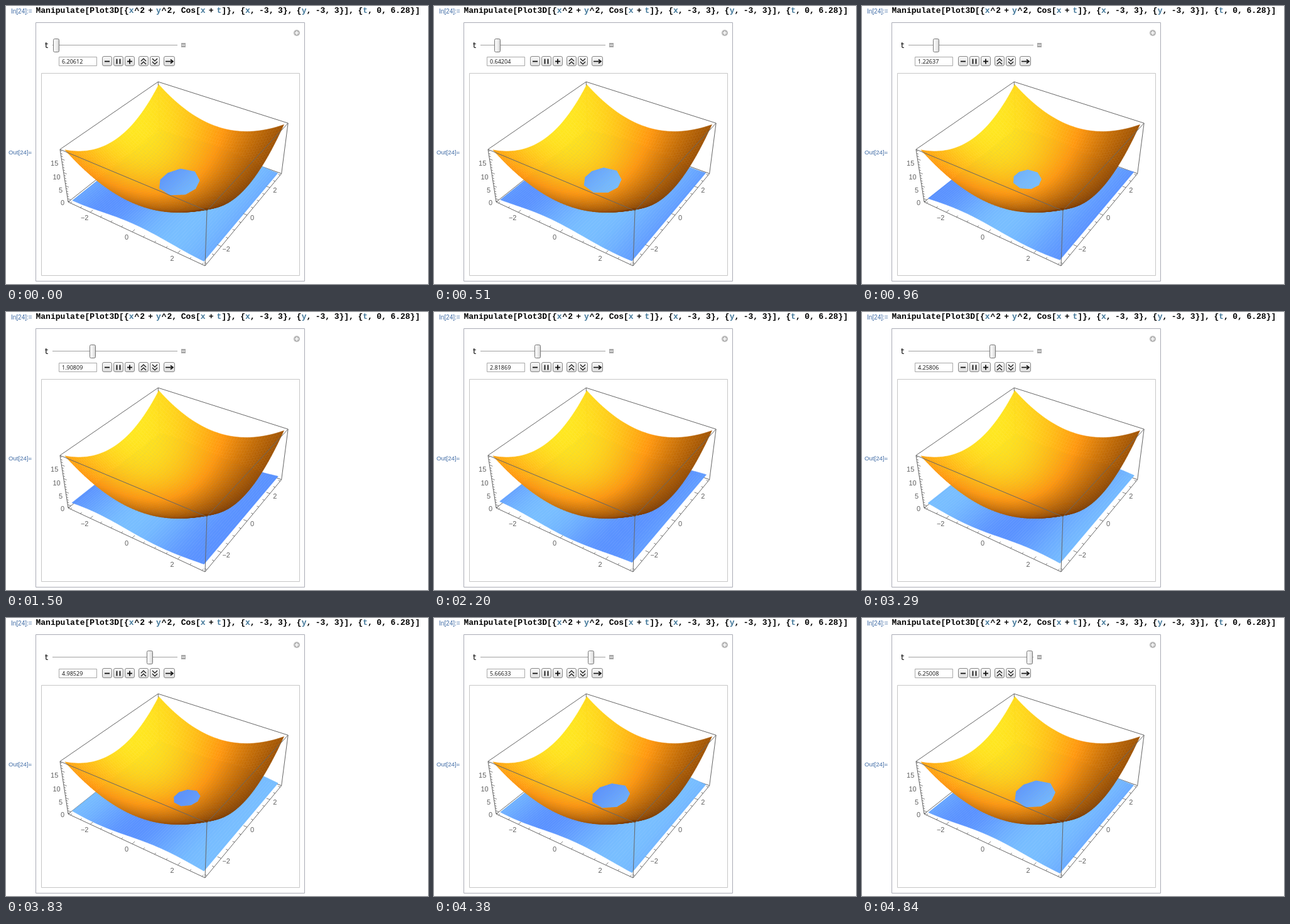
Recreate the animation shown at these times as an HTML page with a canvas. Size 672 by 444 pixels, loop 4.99 s.

```html
<!DOCTYPE html>
<html lang="en">
<head>
<meta charset="utf-8">
<title>Manipulate Plot3D</title>
<style>
html, body { margin: 0; width: 672px; height: 444px; overflow: hidden; background: #fff; }
canvas { display: block; }
</style>
</head>
<body>
<canvas id="stage" width="672" height="444"></canvas>
<script>
const W = 672, H = 444, LOOP = 4990;
const FIRST = 33, PERIOD = 77.2;
const stage = document.getElementById('stage').getContext('2d');
const SANS = '"Liberation Sans", Arial, sans-serif';
const MONO = '"Liberation Mono", "Courier New", monospace';

// Refresh count since the start; every eleventh refresh is dropped
function stepAt(time) {
  const n = Math.floor((time - FIRST) / PERIOD);
  return n % 11 === 4 ? n - 1 : n;
}

// Refresh count and parameter t, nearly linear
const keys = [[0, 0.05], [6, 0.64204], [19, 1.90809], [28, 2.81869],
  [42, 4.25806], [49, 4.98529], [62, 6.25008]];

function paramAt(n) {
  let i = 0;
  while (i < keys.length - 2 && n >= keys[i + 1][0]) i++;
  const [n0, t0] = keys[i], [n1, t1] = keys[i + 1];
  return t0 + (t1 - t0) * (n - n0) / (n1 - n0);
}

// Perspective of the unit box
function project(a, b, c) {
  const d = 1 - 0.1199 * a + 0.197 * b - 0.06684 * c;
  return [
    (99 + 179.99 * a + 193.5 * b - 18.75 * c) / d,
    (313 + 52.24 * a - 76.9 * b - 99.31 * c) / d
  ];
}
const ux = x => (x + 3.12) / 6.24;
const uz = z => (z + 1.38) / 19.76;
const point = (x, y, z) => project(ux(x), ux(y), uz(z));

function trace(g, pts) {
  g.beginPath();
  pts.forEach(p => g.lineTo(p[0], p[1]));
}

function fillPoly(g, pts, color) {
  trace(g, pts);
  g.closePath();
  g.fillStyle = g.strokeStyle = color;
  g.lineWidth = 0.5;
  g.fill();
  g.stroke();
}

function line(g, pts, color, width = 1) {
  trace(g, pts);
  g.strokeStyle = color;
  g.lineWidth = width;
  g.stroke();
}

function text(g, str, x, y, font, color, align = 'left') {
  g.font = font;
  g.fillStyle = color;
  g.textAlign = align;
  g.fillText(str, x, y);
}

function box(g, x, y, w, h, r, fill, stroke) {
  g.beginPath();
  g.roundRect(x, y, w, h, r);
  if (fill) { g.fillStyle = fill; g.fill(); }
  g.strokeStyle = stroke;
  g.lineWidth = 1;
  g.stroke();
}

function layer(paint) {
  const c = document.createElement('canvas');
  c.width = W;
  c.height = H;
  paint(c.getContext('2d'));
  return c;
}

function bowlColor(x, y) {
  const nx = -0.253 * x, ny = -0.253 * y;
  const v = (0.58 * nx - 0.2 * ny + 0.625) / Math.hypot(nx, ny, 1);
  const r = Math.min(255, 118 + 150 * v + 150 * v * v);
  const green = 56 + 95 * v + 122 * v * v;
  return `rgb(${r},${green},${2 + 40 * v * v})`;
}

const bowl = layer(g => {
  const n = 48, s = 6 / n;
  const at = (x, y) => point(x, y, x * x + y * y);
  for (let j = n - 1; j >= 0; j--) {
    for (let i = 0; i < n; i++) {
      const x = -3 + i * s, y = -3 + j * s;
      fillPoly(g, [at(x, y), at(x + s, y), at(x + s, y + s), at(x, y + s)],
        bowlColor(x + s / 2, y + s / 2));
    }
  }
});

function drawWave(g, t) {
  const n = 60, s = 6 / n;
  for (let i = 0; i < n; i++) {
    const x = -3 + i * s;
    const z0 = Math.cos(x + t), z1 = Math.cos(x + s + t);
    const k = Math.sin(x + s / 2 + t);
    fillPoly(g, [point(x, -3, z0), point(x + s, -3, z1), point(x + s, 3, z1), point(x, 3, z0)],
      `rgb(${105 + 15 * k},${168 + 22 * k},255)`);
  }
}

// Coarse outline of the region where the wave lies above the bowl
function holeShape(t) {
  const f = (x, y) => Math.cos(x + t) - x * x - y * y - 0.11;
  let cx = 0;
  for (let x = -1; x <= 1; x += 0.01) if (f(x, 0) > f(cx, 0)) cx = x;
  if (f(cx, 0) < 0) return null;
  const pts = [], sides = 9;
  for (let i = 0; i < sides; i++) {
    const angle = i * 2 * Math.PI / sides;
    const u = Math.cos(angle), v = Math.sin(angle);
    let lo = 0, hi = 2;
    for (let n = 0; n < 20; n++) {
      const r = (lo + hi) / 2;
      if (f(cx + r * u, r * v) > 0) lo = r; else hi = r;
    }
    const x = cx + lo * u;
    pts.push(point(x, lo * v, Math.cos(x + t)));
  }
  return pts;
}

// Corners are numbered by bits x, y, z; corner 2 is the hidden one
function boxEdges(g, back) {
  for (let i = 0; i < 8; i++) {
    for (const bit of [1, 2, 4]) {
      if (i & bit) continue;
      const j = i | bit;
      if ((i === 2 || j === 2) !== back) continue;
      line(g, [i, j].map(k => project(k & 1, k >> 1 & 1, k >> 2)), '#666');
    }
  }
}

function axis(g, from, to, step, major, at, dx, dy, align) {
  for (let v = from; v <= to; v += step) {
    const big = v % major === 0;
    const p = at(v, 0);
    line(g, [p, at(v, big ? 0.025 : 0.014)], '#606060', 0.8);
    if (big) {
      text(g, String(v).replace('-', '−'), p[0] + dx, p[1] + dy, '11px ' + SANS, '#606060', align);
    }
  }
}

function axes(g) {
  axis(g, -3, 3, 0.5, 2, (v, d) => project(ux(v), d, 0), -9, 12.5, 'center');
  axis(g, -3, 3, 0.5, 2, (v, d) => project(1 - d, ux(v), 0), 8, 8, 'center');
  axis(g, -1, 18, 1, 5, (v, d) => project(d, 0, uz(v)), -5, 10.5, 'right');
}

function codeLine(g) {
  const code = 'Manipulate[Plot3D[{x^2+y^2, Cos[x+t]}, {x, -3, 3}, {y, -3, 3}], {t, 0, 6.28}]';
  const pad = { '+': 5, '^': 1, ' ': -0.65 };
  let x = 47.5;
  for (const part of code.split(/(\b[xyt]\b|[+^ ])/)) {
    const extra = pad[part] || 0;
    text(g, part, x + extra, 11, 'bold 13px ' + MONO, /^[xyt]$/.test(part) ? '#43789a' : '#000');
    x += g.measureText(part).width + 2 * extra;
  }
}

function buttons(g) {
  const ink = '#111';
  const fill = g.createLinearGradient(0, 80, 0, 96);
  fill.addColorStop(0, '#fafafa');
  fill.addColorStop(1, '#dcdcdc');
  const across = x => line(g, [[x - 4, 88.5], [x + 4, 88.5]], ink, 1.8);
  const down = x => line(g, [[x, 84.5], [x, 92.5]], ink, 1.8);
  const chevrons = dir => x => [-2.5, 2.5].forEach(o => {
    const y = 88.5 + o;
    line(g, [[x - 4, y - 2 * dir], [x, y + 2 * dir], [x + 4, y - 2 * dir]], ink, 1.2);
  });
  const icons = [
    across,
    x => { down(x - 2.5); down(x + 2.5); },
    x => { across(x); down(x); },
    chevrons(-1),
    chevrons(1),
    x => {
      line(g, [[x - 6, 88.5], [x + 5, 88.5]], ink, 1.6);
      line(g, [[x + 2, 85.5], [x + 6, 88.5], [x + 2, 91.5]], ink, 1.6);
    }
  ];
  icons.forEach((icon, i) => {
    const left = 153 + 18 * i + (i > 2 ? 4 : 0) + (i > 4 ? 4 : 0);
    const w = i > 4 ? 18 : 16;
    box(g, left + 0.5, 80.5, w - 1, 15, 2.5, fill, '#858585');
    icon(left + w / 2);
  });
}

const panel = layer(g => {
  g.fillStyle = '#fff';
  g.fillRect(0, 0, W, H);
  text(g, 'In[24]:=', 8, 12, '10px ' + SANS, '#3f6ba5');
  text(g, 'Out[24]=', 4, 237, '9.6px ' + SANS, '#3f6ba5');
  codeLine(g);
  box(g, 47.5, 26.5, 428, 413, 0, null, '#a9abb5');
  box(g, 56.5, 107.5, 411, 323, 0, null, '#c6c6c6');

  text(g, 't', 62, 67, '13px "DejaVu Sans", sans-serif', '#000');
  line(g, [[74, 62.5], [273, 62.5]], '#a0a0a0');
  g.fillStyle = '#aaa';
  g.fillRect(279, 59, 7, 7);
  line(g, [[280, 62.5], [285, 62.5]], '#fff');

  g.beginPath();
  g.arc(463, 43, 5, 0, 7);
  g.fillStyle = '#b8b8b8';
  g.fill();
  line(g, [[460, 43], [466, 43]], '#fff', 1.4);
  line(g, [[463, 40], [463, 46]], '#fff', 1.4);

  box(g, 84.5, 81.5, 60, 14, 0, '#fff', '#a8a8a8');
  buttons(g);
});

function knob(g, x) {
  const left = Math.round(x) - 5;
  const fill = g.createLinearGradient(left, 0, left + 10, 0);
  fill.addColorStop(0, '#fdfdfd');
  fill.addColorStop(0.5, '#f0f0f0');
  fill.addColorStop(1, '#cfcfcf');
  box(g, left + 0.5, 52.5, 9, 21, 2, fill, '#777');
}

function draw(n) {
  // Before the first refresh the plot still shows the end of the last sweep
  const t = n < 0 ? 6.20612 : paramAt(n);
  const g = stage;
  g.drawImage(panel, 0, 0);
  knob(g, n < 0 ? 80 : 81.8 + 29.6 * t);
  text(g, t.toFixed(5), 89, 92, '9px "Open Sans", sans-serif', '#111');

  boxEdges(g, true);
  drawWave(g, t);
  g.drawImage(bowl, 0, 0);
  const hole = holeShape(t);
  if (hole) {
    g.save();
    trace(g, hole);
    g.closePath();
    g.clip();
    drawWave(g, t);
    g.restore();
  }
  boxEdges(g, false);
  axes(g);
}

let shown;
function tick() {
  const n = stepAt(performance.now() % LOOP);
  if (n !== shown) {
    shown = n;
    draw(n);
  }
  requestAnimationFrame(tick);
}
tick();
</script>
</body>
</html>
```
